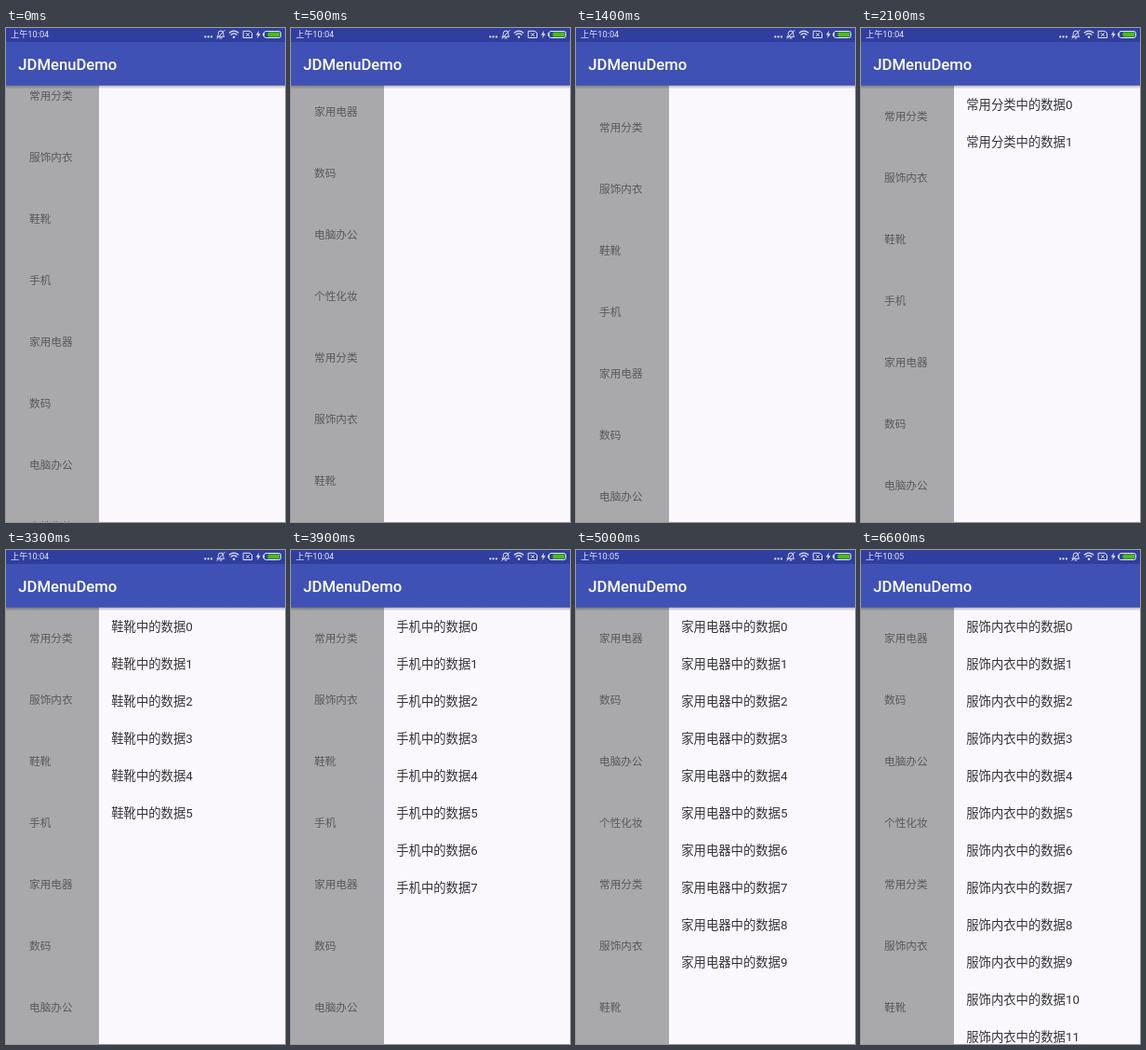
An HTML page that plays this animation: 300x530 px, repeating every 7000 ms.

```html
<!DOCTYPE html>
<html lang="zh-CN">
<head>
<meta charset="utf-8">
<title>JDMenuDemo</title>
<style>
  html, body { margin: 0; width: 100%; height: 100%; overflow: hidden; background: #faf8fd; }
  svg { display: block; width: 300px; height: 530px; }
  text { font-family: Roboto, "Noto Sans CJK SC", "Noto Sans CJK", sans-serif; }
  #menu text { font-size: 11.67px; fill: #5a595b; }
  #rows text { font-size: 13.33px; fill: #333235; }
  #clock { font-size: 9.2px; fill: #e4e6f5; }
  .title { font-size: 16.67px; font-weight: 500; fill: #fff; }
  .line { fill: none; stroke: #e4e6f5; stroke-linecap: round; stroke-linejoin: round; }
  .solid { fill: #e4e6f5; }
</style>
</head>
<body>
<svg viewBox="0 0 300 530">
  <defs>
    <linearGradient id="shade" x2="0" y2="1">
      <stop offset="0" stop-opacity=".3"/>
      <stop offset="1" stop-opacity="0"/>
    </linearGradient>
  </defs>
  <rect width="300" height="530" fill="#faf8fd"/>
  <rect width="100" height="530" fill="#a9a8aa"/>
  <g id="menu"></g>
  <g id="rows"></g>

  <rect y="61" width="300" height="4.5" fill="url(#shade)"/>
  <rect width="300" height="61.67" fill="#3f51b5"/>
  <rect width="300" height="15" fill="#303f9f"/>
  <text class="title" x="13.3" y="45">JDMenuDemo</text>
  <text id="clock" x="5" y="10.4"></text>

  <g class="solid">
    <circle cx="214.3" cy="9.4" r="1.1"/>
    <circle cx="217.6" cy="9.4" r="1.1"/>
    <circle cx="220.9" cy="9.4" r="1.1"/>
    <circle cx="245" cy="9.8" r="1.2"/>
    <path d="M272.2 2.8l-3.4 4.700h2.200l-.9 3.700 3.600-4.900h-2.300z"/>
  </g>
  <g class="line">
    <path d="M227.300 9.300h7.400c-1-1.100-1-2-1-3.600a2.700 2.700 0 0 0-5.400 0c0 1.600 0 2.500-1 3.600zM230 11h2M227 11.300l8-8.800"/>
    <path d="M240.300 5q4.700-3.900 9.400 0M242 7.200q3-2.500 6 0" stroke-width="1.3"/>
    <path d="M255.500 3.300h6.500l2.500 2v5.200h-9z"/>
    <path d="M258.400 5.600l3 3m0-3l-3 3"/>
  </g>
  <rect class="solid" x="276" y="5.300" width="1.500" height="3.400" rx=".6"/>
  <rect class="line" x="277.500" y="3.500" width="18" height="7" rx="2"/>
  <rect x="281.500" y="4.500" width="13" height="5" rx="1" fill="#4cbb17"/>
</svg>
<script>
const LOOP = 7000, TICK = 100, PITCH = 66, ROW = 40, MAX_ROWS = 12;
const names = ["常用分类", "服饰内衣", "鞋靴", "手机", "家用电器", "数码", "电脑办公", "个性化妆"];
const span = PITCH * names.length;

// Taps as [time, item]; every tap lists two more rows than the last.
const taps = [[2100, 0], [2700, 1], [3300, 2], [3900, 3], [4400, 4], [6200, 0], [6600, 1]];

const clock = document.getElementById("clock");

function addText(parent, x) {
  const el = document.createElementNS("http://www.w3.org/2000/svg", "text");
  el.setAttribute("x", x);
  return document.getElementById(parent).appendChild(el);
}

const items = names.map(name => {
  const el = addText("menu", 25);
  el.textContent = name;
  return el;
});

const rows = Array.from({ length: MAX_ROWS }, (_, i) => {
  const el = addText("rows", 113.3);
  el.setAttribute("y", 87 + ROW * i);
  return el;
});

const clamp = v => Math.min(1, Math.max(0, v));

function scrollAt(t) {
  const fling = 22 + (span - 22) * (1 - Math.pow(1 - clamp(t / 1600), 1.783));
  const glide = PITCH * 4 * (1 - Math.cos(Math.PI * clamp((t - 4376) / 325))) / 2;
  return Math.round(fling + glide);
}

function draw(t) {
  const offset = scrollAt(t);
  items.forEach((el, i) => {
    const y = (65 + PITCH * i - offset + span * 3) % span + 30;
    el.setAttribute("y", y + 4);
  });

  const count = taps.filter(([time]) => time <= t).length;
  const name = count ? names[taps[count - 1][1]] : "";
  rows.forEach((el, i) => {
    el.textContent = i < count * 2 ? name + "中的数据" + i : "";
  });

  clock.textContent = t < 4800 ? "上午10:04" : "上午10:05";
}

let last = -1;
function frame() {
  const t = Math.floor(performance.now() % LOOP / TICK) * TICK;
  if (t !== last) draw(last = t);
  requestAnimationFrame(frame);
}
frame();
</script>
</body>
</html>
```
